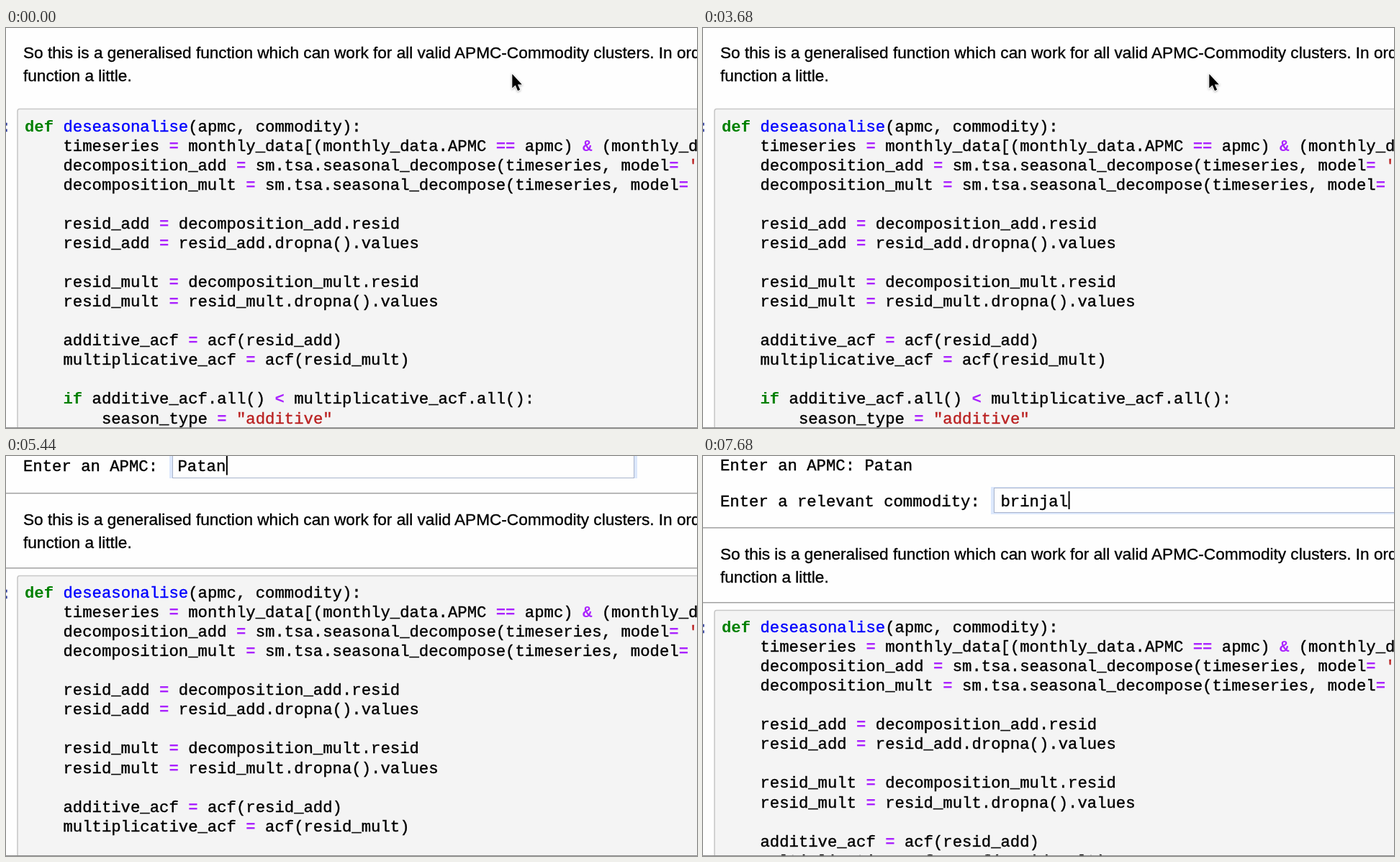
Animation of 960 by 556 pixels, one loop 8 s. Source, as an HTML page:

```html
<!DOCTYPE html>
<html lang="en">
<head>
<meta charset="utf-8">
<style>
  html, body { margin: 0; width: 100%; height: 100%; overflow: hidden; background: #fefefe; }
  svg { display: block; width: 960px; height: 556px; }
  text { white-space: pre; fill: #000; stroke: #000; }
  .mono { font: 22.28px "Liberation Mono", monospace; stroke-width: .4px; }
  .prose { font: 22.6px "Liberation Sans", sans-serif; stroke-width: .35px; }
  .keyword { fill: #008000; stroke: none; font-weight: bold; }
  .operator { fill: #a2f; stroke: none; font-weight: bold; }
  .name { fill: #00f; stroke: #00f; }
  .string { fill: #ba2121; stroke: #ba2121; }
  .prompt { fill: #303f9f; stroke: #303f9f; }
  .rule { fill: #a2a2a2; }
  .halo { fill: #dce8fc; }
  .field { fill: #fefefe; stroke: #a9b4cc; }
</style>
</head>
<body>
<svg viewBox="0 0 960 556">
  <g id="first">
    <text class="mono" x="24" y="20.5">Enter an APMC:</text>
    <rect class="halo" x="227" y="-9" width="650" height="40"/>
    <rect class="field" x="231.5" y="-5.5" width="641" height="36"/>
    <text class="mono" x="238.5" y="20.5"></text>
    <rect class="caret" y="0" width="2" height="26.5"/>
  </g>
  <g id="second">
    <text class="mono" x="24" y="19.5">Enter an APMC: Patan</text>
    <text class="mono" x="24" y="69.5">Enter a relevant commodity:</text>
    <rect class="halo" x="400" y="43" width="570" height="38"/>
    <rect class="field" x="404.5" y="44.5" width="570" height="34"/>
    <text class="mono" x="413.5" y="69.5"></text>
    <rect class="caret" y="49" width="2" height="25"/>
  </g>
  <g id="page">
    <g id="rules">
      <rect class="rule" y="-3" width="960" height="1.5"/>
      <rect class="rule" y="101" width="960" height="1.5"/>
    </g>
    <text class="prose" x="24" y="42">So this is a generalised function which can work for all valid APMC-Commodity clusters. In order to use it, change the</text>
    <text class="prose" x="24" y="74">function a little.</text>
    <rect x="16" y="112.5" width="1000" height="700" rx="3" fill="#f4f4f4" stroke="#c8c8c8" stroke-width="1.6"/>
    <text class="mono prompt" x="-6.5" y="143.5">:</text>
    <g id="code"></g>
  </g>
  <path id="pointer" d="M703.3 64V83.6L707.7 79.6 711 87.2 714.2 85.8 710.9 78.4H716.8Z"
        stroke="#fff" stroke-width="1.6" paint-order="stroke"
        style="filter: drop-shadow(0 1px 1.5px #0005)"/>
  <rect y="555" width="960" height="1" fill="#8c8c8c"/>
</svg>
<script>
const LOOP = 8000, ADVANCE = 22.28 * 0.6, LINE_HEIGHT = 27.07;

const source = `def deseasonalise(apmc, commodity):
    timeseries = monthly_data[(monthly_data.APMC == apmc) & (monthly_data.Commodity == commodity)]
    decomposition_add = sm.tsa.seasonal_decompose(timeseries, model= 'additive')
    decomposition_mult = sm.tsa.seasonal_decompose(timeseries, model= 'multiplicative')

    resid_add = decomposition_add.resid
    resid_add = resid_add.dropna().values

    resid_mult = decomposition_mult.resid
    resid_mult = resid_mult.dropna().values

    additive_acf = acf(resid_add)
    multiplicative_acf = acf(resid_mult)

    if additive_acf.all() < multiplicative_acf.all():
        season_type = "additive"`;

const tokenPattern = /(?<keyword>\b(?:def|if)\b)|(?<name>\bdeseasonalise\b)|(?<operator>[=<&]+)|(?<string>'[^']*'|"[^"]*")/g;

const byId = id => document.getElementById(id);
const show = (node, visible) => node.style.display = visible ? '' : 'none';

function svgNode(tag, attributes, content = '') {
  const node = document.createElementNS('http://www.w3.org/2000/svg', tag);
  for (const key in attributes) node.setAttribute(key, attributes[key]);
  node.textContent = content;
  return node;
}

source.split('\n').forEach((line, row) => {
  const text = svgNode('text', { class: 'mono', x: 26, y: 143.5 + row * LINE_HEIGHT });
  let end = 0;
  for (const match of line.matchAll(tokenPattern)) {
    const kind = Object.keys(match.groups).find(key => match.groups[key]);
    text.append(line.slice(end, match.index), svgNode('tspan', { class: kind }, match[0]));
    end = match.index + match[0].length;
  }
  text.append(line.slice(end));
  byId('code').append(text);
});

// Each entry is visible from start to end; the caret blinks off between the two blink times.
const entries = [
  { id: 'first', start: 3760, end: 5840, shift: 54, word: 'Patan',
    keys: [4800, 5040, 5200, 5360, 5440], blink: [4160, 4560] },
  { id: 'second', start: 5840, end: LOOP, shift: 102, word: 'brinjal',
    keys: [6800, 6960, 7120, 7280, 7440, 7600, 7680], blink: [6320, 6720] }
];
for (const entry of entries) {
  entry.group = byId(entry.id);
  entry.text = entry.group.querySelector('.field + text');
  entry.caret = entry.group.querySelector('.caret');
  entry.left = Number(entry.text.getAttribute('x'));
}

function draw(time) {
  const active = entries.find(entry => time >= entry.start && time < entry.end);
  for (const entry of entries) show(entry.group, entry === active);
  show(byId('pointer'), !active);
  show(byId('rules'), active);
  byId('page').setAttribute('transform', `translate(0 ${active ? active.shift : 0})`);
  byId('code').setAttribute('transform', `translate(0 ${active ? -0.6 : 0})`);
  if (!active) return;

  const typed = active.keys.filter(key => time >= key).length;
  const [off, on] = active.blink;
  active.text.textContent = active.word.slice(0, typed);
  active.caret.setAttribute('x', active.left + 0.5 + typed * ADVANCE);
  show(active.caret, time < off || time >= on);
}

const begin = performance.now();
function tick() {
  draw((performance.now() - begin) % LOOP);
  requestAnimationFrame(tick);
}
tick();
</script>
</body>
</html>
```
